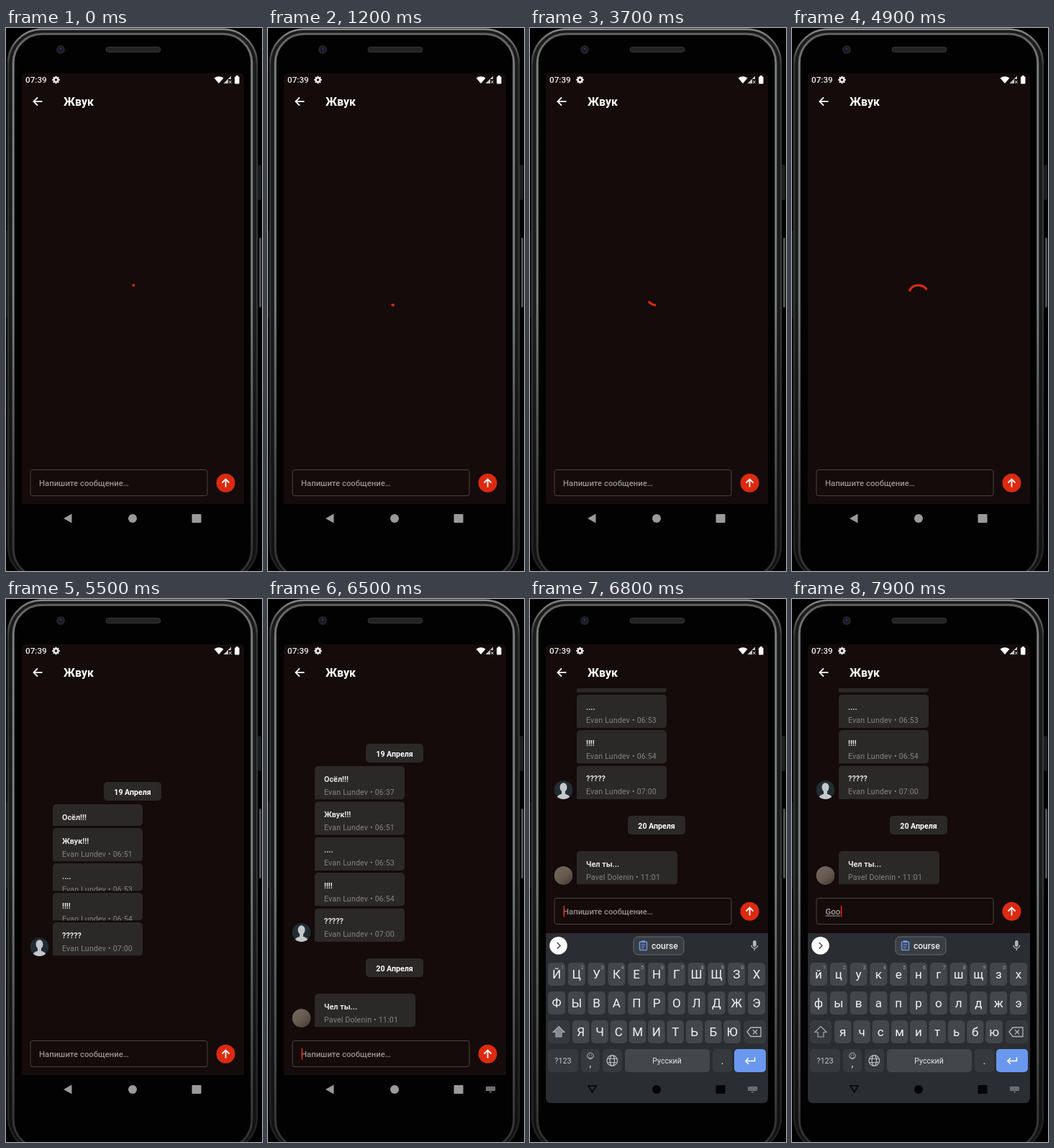
Recreate the animation shown at these times as an HTML page with a canvas. Size 356x754 px, loop 8 s.

```html
<!DOCTYPE html>
<html lang="ru">
<head>
<meta charset="utf-8">
<title>Chat</title>
<style>
html, body { margin: 0; width: 100%; height: 100%; overflow: hidden; background: #000; }
canvas { display: block; width: 356px; height: 754px; }
</style>
</head>
<body>
<canvas id="stage"></canvas>
<script>
const W = 356, H = 754, LOOP = 8000, STEP = 100;
const APP = '#140b0a', BUBBLE = '#2b2828', RED = '#dc2a10', PANEL = '#2a2d32', KEY = '#43474c', KEY_DARK = '#363a3f';
const KEYBOARD_HEIGHT = 198;

const canvas = document.getElementById('stage');
const ratio = window.devicePixelRatio || 1;
canvas.width = W * ratio;
canvas.height = H * ratio;
const ctx = canvas.getContext('2d');

const clamp = v => Math.max(0, Math.min(1, v));
const mix = (a, b, k) => a + (b - a) * k;
const easeOut = k => 1 - (1 - clamp(k)) ** 3;

// Cubic easing (0.4, 0, 0.2, 1), solved by bisection.
function fastOutSlowIn(x) {
  x = clamp(x);
  let lo = 0, hi = 1;
  for (let i = 0; i < 24; i++) {
    const s = (lo + hi) / 2, r = 1 - s;
    if (1.2 * s * r * r + 0.6 * s * s * r + s ** 3 < x) lo = s; else hi = s;
  }
  return lo * lo * (3 - 2 * lo);
}

function box(x, y, w, h, r, fill, stroke, line = 1) {
  ctx.beginPath();
  ctx.roundRect(x, y, w, h, r);
  if (fill) { ctx.fillStyle = fill; ctx.fill(); }
  if (stroke) { ctx.strokeStyle = stroke; ctx.lineWidth = line; ctx.stroke(); }
}

function disc(x, y, r, fill) {
  ctx.beginPath();
  ctx.arc(x, y, r, 0, 7);
  ctx.fillStyle = fill;
  ctx.fill();
}

function trace(points, closed) {
  ctx.beginPath();
  for (let i = 0; i < points.length; i += 2) ctx.lineTo(points[i], points[i + 1]);
  if (closed) ctx.closePath();
}

function poly(points, fill) {
  trace(points, true);
  ctx.fillStyle = fill;
  ctx.fill();
}

function line(points, color, width, closed) {
  trace(points, closed);
  ctx.strokeStyle = color;
  ctx.lineWidth = width;
  ctx.stroke();
}

function text(str, x, y, size, color, weight = 400, align = 'left', spacing = 0) {
  ctx.font = `${weight} ${size}px Roboto, sans-serif`;
  ctx.letterSpacing = spacing + 'px';
  ctx.textAlign = align;
  ctx.fillStyle = color;
  ctx.fillText(str, x, y);
}

function clipped(x, y, w, h, draw) {
  ctx.save();
  ctx.beginPath();
  ctx.rect(x, y, w, h);
  ctx.clip();
  draw();
  ctx.restore();
}

function shade(top, side, bottom) {
  const g = ctx.createLinearGradient(0, 0, 0, H);
  g.addColorStop(0, top);
  g.addColorStop(0.07, side);
  g.addColorStop(0.5, side);
  g.addColorStop(1, bottom);
  return g;
}

function phone() {
  ctx.fillStyle = '#000';
  ctx.fillRect(0, 0, W, H);
  box(350, 190, 5, 49, 2, '#1c1d1d');
  box(352, 291, 3, 97, 1.5, '#505151');
  box(0, 282, 1.5, 120, 0, '#151616');
  box(3, 1.8, 346, 765, 47, shade('#1c1c1c', '#191a1a', '#111'), shade('#8c8c8c', '#353636', '#222'), 2.4);
  box(10.2, 8.3, 331.6, 755, 40, '#020202', shade('#5c5c5c', '#7c7d7d', '#303030'), 3);
  box(139, 26.5, 76, 7, 3.5, '#222323', '#343636');
  disc(76, 30, 6, '#202225');
  disc(76, 30, 3.2, '#14182a');
  disc(76, 29, 1.2, '#343d5d');
  box(22, 63, 309, 598, [5, 5, 0, 0], APP);
}

function statusBar() {
  text('07:39', 27, 76, 11.7, '#eee', 500);
  for (let i = 0; i < 8; i++) {
    const a = i * Math.PI / 4;
    line([69.5, 72, 69.5 + 5.3 * Math.cos(a), 72 + 5.3 * Math.sin(a)], '#eee', 2);
  }
  disc(69.5, 72, 4, '#eee');
  disc(69.5, 72, 1.7, APP);
  ctx.beginPath();
  ctx.moveTo(296, 77);
  ctx.lineTo(289.5, 69.5);
  ctx.quadraticCurveTo(296, 65, 302.5, 69.5);
  ctx.fillStyle = '#fff';
  ctx.fill();
  poly([302.5, 77, 313, 66.5, 313, 71, 309, 71, 309, 77], '#c9c7c7');
  line([310, 73, 313.5, 77], '#ddd', 1);
  line([313.5, 73, 310, 77], '#ddd', 1);
  box(318, 67.5, 6.5, 10, 1, '#fff');
  box(319.8, 66, 3, 2, 0, '#fff');
  line([50.5, 102, 38.5, 102], '#fff', 1.8);
  line([44, 96.3, 38.4, 102, 44, 107.7], '#fff', 1.8);
  text('Жвук', 80, 108, 16, '#fff', 700);
}

function spinner(t) {
  const time = t + 25, phase = time / 1333 % 1;
  const head = 0.75 * fastOutSlowIn(phase * 2);
  const tail = 0.75 * fastOutSlowIn(phase * 2 - 1);
  const start = 2 * Math.PI * (tail + time / 2222 + phase / 4 - 0.25);
  ctx.beginPath();
  ctx.arc(175.8, 371, 13.9, start, start + Math.max(2 * Math.PI * (head - tail), 0.01));
  ctx.lineCap = 'square';
  ctx.strokeStyle = RED;
  ctx.lineWidth = 3.2;
  ctx.stroke();
  ctx.lineCap = 'butt';
}

function datePill(y, label) {
  box(136, y, 80, 26, 5, BUBBLE);
  text(label, 176, y + 17.5, 10.6, '#fff', 700, 'center');
}

function bubble(y, h, w, body, caption) {
  clipped(60, y, 160, h, () => {
    box(65, y, w, h, [5, 5, 5, 1], BUBBLE);
    text(body, 78, y + 21.5, 10.8, '#e6e4e4', 700);
    text(caption, 78, y + 39.5, 10.6, '#858282', 400, 'left', 0.2);
  });
}

function avatar(y, draw) {
  ctx.save();
  ctx.beginPath();
  ctx.arc(46.5, y, 13, 0, 7);
  ctx.clip();
  draw(y);
  ctx.restore();
}

function plainAvatar(y) {
  disc(46.5, y, 13, '#222c32');
  ctx.fillStyle = '#c3c8ca';
  ctx.beginPath();
  ctx.ellipse(46.5, y - 3.5, 5, 6.3, 0, 0, 7);
  ctx.ellipse(46.5, y + 12, 9.5, 6.5, 0, 0, 7);
  ctx.fill();
  box(44, y, 5, 8, 0, '#c3c8ca');
}

function photoAvatar(y) {
  const g = ctx.createLinearGradient(36, y - 12, 56, y + 12);
  g.addColorStop(0, '#74685d');
  g.addColorStop(0.55, '#67594e');
  g.addColorStop(1, '#4a3d36');
  disc(46.5, y, 13, g);
}

// Each message: text, time, entering top and height.
const messages = [
  ['Осёл!!!', '06:37', 285, 30],
  ['Жвук!!!', '06:51', 318, 46.5],
  ['....', '06:53', 367, 38.5],
  ['!!!!', '06:54', 408, 38.5],
  ['?????', '07:00', 449, 46.5]
];

function chat(t) {
  const grow = easeOut((t - 5500) / 400);
  if (t >= 5500) {
    datePill(mix(254, 201, grow), '19 Апреля');
    messages.forEach(([body, time, y, h], i) =>
      bubble(mix(y, 232 + i * 49.35, grow), mix(h, 46.5, grow), 125, body, 'Evan Lundev • ' + time));
    avatar(mix(483, 463, grow), plainAvatar);
  }
  ctx.globalAlpha = t < 5500 ? 1 : clamp((t - 5500) / 300);
  datePill(499, '20 Апреля');
  bubble(548, 46.5, 140, 'Чел ты...', 'Pavel Dolenin • 11:01');
  avatar(582, photoAvatar);
  ctx.globalAlpha = 1;
}

function inputRow(t) {
  const typed = t < 7300 ? '' : t < 7800 ? 'G' : t < 7900 ? 'Go' : 'Goo';
  box(34, 613.5, 246, 36, 3, null, '#4b4543');
  let end = 46.5;
  if (typed) {
    text(typed, 46.5, 636, 11.3, '#d2cfce');
    const width = ctx.measureText(typed).width;
    box(46.5, 637.5, width, 1, 0, '#a9a5a4');
    end += width + 0.7;
  } else {
    text('Напишите сообщение…', 46, 636, 11.3, '#979291', 500);
  }
  const cursorOn = t >= 6400 && t < 6900 || t >= 7300;
  if (cursorOn) box(end, 624, 1.6, 15.5, 0, RED);
  disc(305.5, 631.7, 13, RED);
  line([305.5, 637.5, 305.5, 627], '#fff', 1.8);
  line([300.5, 631.5, 305.5, 626.5, 310.5, 631.5], '#fff', 1.8);
}

function key(cx, y, w, label, hint) {
  box(cx - w / 2, y, w, 32, 5, KEY);
  text(label, cx, y + 22, 17, '#f1f2f3', 400, 'center');
  if (hint) text(hint, cx + w / 2 - 4, y + 9, 7, '#9a9da1', 400, 'center');
}

function toolbar() {
  disc(39.5, 481.3, 12.3, '#fff');
  line([37.7, 477, 42, 481.3, 37.7, 485.6], '#4b4e53', 1.5);
  box(144, 469, 70, 25, 6, '#3a3e43', '#676b70');
  box(152.5, 476, 10, 11.5, 1, null, '#6a98ee', 1.5);
  box(155, 474.3, 5, 3, 1, '#6a98ee');
  for (let i = 0; i < 3; i++) box(154.7, 479 + i * 2.5, i < 2 ? 5.5 : 4, 1, 0, '#6a98ee');
  text('course', 169, 485.7, 12, '#eceded', 500);
  box(310, 474, 4.6, 9, 2.3, '#b4b7ba');
  ctx.beginPath();
  ctx.arc(312.3, 480.7, 4.3, 0, Math.PI);
  ctx.strokeStyle = '#b4b7ba';
  ctx.lineWidth = 1.3;
  ctx.stroke();
  line([312.3, 485, 312.3, 488.3], '#b4b7ba', 1.3);
}

function keyRows(lower) {
  const letters = s => [...(lower ? s.toLowerCase() : s)];
  letters('ЙЦУКЕНГШЩЗХ').forEach((c, i) => key(37 + i * 27.8, 505, 24, c, '1234567890'[i]));
  letters('ФЫВАПРОЛДЖЭ').forEach((c, i) => key(37 + i * 27.8, 545, 24, c));
  letters('ЯЧСМИТЬБЮ').forEach((c, i) => key(70.7 + i * 26.3, 585, 23.5, c));

  box(25, 585, 30, 32, 5, KEY_DARK);
  const shift = [40, 593.5, 48, 601.5, 44, 601.5, 44, 608, 36, 608, 36, 601.5, 32, 601.5];
  if (!lower) poly(shift, '#85898d');
  line(shift, '#a6a9ad', 1.2, true);
  box(297, 585, 31, 32, 5, KEY_DARK);
  line([302, 601, 307, 595, 321, 595, 321, 607.5, 307, 607.5], '#b4b7ba', 1.3, true);
  line([310, 598.3, 316, 604.3], '#b4b7ba', 1.3);
  line([316, 598.3, 310, 604.3], '#b4b7ba', 1.3);
}

function bottomRow() {
  [[25, 42], [71, 26], [101, 27], [254, 27]].forEach(([x, w]) => box(x, 625, w, 32, 5, KEY_DARK));
  box(132, 625, 118, 32, 5, KEY);
  box(284, 625, 44, 32, 5, '#6a98ee');
  text('?123', 46, 645, 10.8, '#c4c6c9', 400, 'center');
  ctx.beginPath();
  ctx.arc(84, 634.5, 4.3, 0, 7);
  ctx.moveTo(86.3, 635.5);
  ctx.arc(84, 635.5, 2.3, 0, Math.PI);
  ctx.strokeStyle = '#b4b7ba';
  ctx.lineWidth = 1;
  ctx.stroke();
  disc(82.5, 633.2, 0.7, '#b4b7ba');
  disc(85.5, 633.2, 0.7, '#b4b7ba');
  text(',', 84, 650, 14, '#e5e6e8', 400, 'center');
  ctx.beginPath();
  ctx.arc(114.3, 641, 7.3, 0, 7);
  ctx.moveTo(117.5, 641);
  ctx.ellipse(114.3, 641, 3.2, 7.3, 0, 0, 7);
  ctx.strokeStyle = '#c0c3c6';
  ctx.lineWidth = 1.2;
  ctx.stroke();
  line([108, 638.3, 120.6, 638.3], '#c0c3c6', 1.1);
  line([108, 643.7, 120.6, 643.7], '#c0c3c6', 1.1);
  text('Русский', 190.5, 645, 10.5, '#e5e6e8', 400, 'center');
  text('.', 267.5, 646, 15, '#e5e6e8', 400, 'center');
  line([312.5, 636.5, 312.5, 641.5, 300, 641.5], '#fff', 1.6);
  line([304, 637.3, 299.8, 641.5, 304, 645.7], '#fff', 1.6);
}

function keyboard(t, shown) {
  const drop = KEYBOARD_HEIGHT * (1 - shown);
  box(22, 464 + drop, 309, 236 - drop, [0, 0, 7, 7], PANEL);
  clipped(22, 464, 309, 197, () => {
    ctx.translate(0, drop);
    toolbar();
    keyRows(t >= 7400);
    bottomRow();
  });
}

function navBar(t, open) {
  const color = open ? '#050505' : '#9b9999';
  if (open) line([81, 676, 92, 676, 86.5, 685], color, 1.6, true);
  else poly([80, 681, 91.5, 674.5, 91.5, 687.5], color);
  disc(176, 681, 6, color);
  box(258.5, 675, 13, 12, 1, color);
  if (t < 6400) return;
  const icon = open ? '#777a7e' : '#8b8989';
  box(303, 677, 13, 6, 1, icon);
  for (let i = 0; i < 10; i++)
    box(304.3 + (i % 5) * 2.3, 678.2 + Math.floor(i / 5) * 2.2, 1, 1, 0, open ? PANEL : '#000');
  poly([307.5, 684, 311.5, 684, 309.5, 686], icon);
}

function render(t) {
  const shown = easeOut((t - 6500) / 300);
  const lift = -KEYBOARD_HEIGHT * shown;
  ctx.setTransform(ratio, 0, 0, ratio, 0, 0);
  phone();
  statusBar();
  if (t < 5400) {
    spinner(t);
  } else {
    clipped(22, 124, 309, 483 + lift, () => {
      ctx.translate(0, lift);
      chat(t);
    });
  }
  ctx.save();
  ctx.translate(0, lift);
  inputRow(t);
  ctx.restore();
  if (shown > 0) keyboard(t, shown);
  navBar(t, shown > 0);
}

const origin = performance.now();
function tick() {
  const t = (performance.now() - origin) % LOOP;
  render(Math.floor(t / STEP) * STEP);
  requestAnimationFrame(tick);
}
tick();
</script>
</body>
</html>
```
